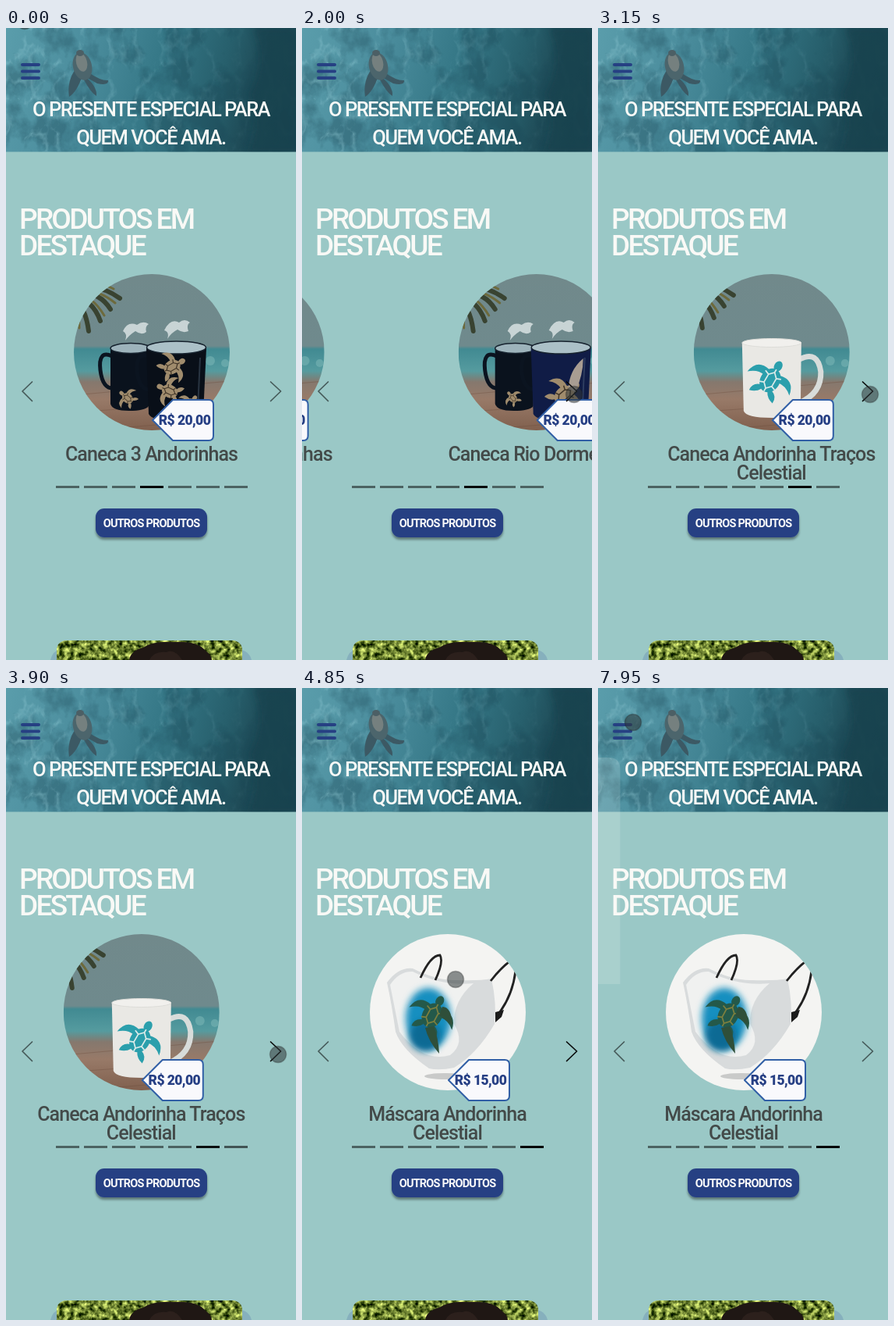
An HTML page that plays this animation: 372x809 px, repeating every 8 s.

```html
<!DOCTYPE html>
<html lang="pt-BR">
<head>
<meta charset="utf-8">
<title>Produtos em destaque</title>
<style>
  html, body { margin: 0; height: 100%; overflow: hidden; background: #9ac8c6; }
  svg { display: block; width: 100vw; height: 100vh; }
  text { font-family: Roboto, Inter, sans-serif; font-weight: 500; }
  .middle { text-anchor: middle; }
  .hero { font-size: 25.5px; letter-spacing: -1.5px; fill: #f9f9f6; }
  .title { font-size: 37px; letter-spacing: -2.7px; fill: #f9f9f6; }
  .name { font-size: 25px; letter-spacing: -.9px; fill: #434a49; }
  .price { font-size: 17.5px; font-weight: 800; letter-spacing: -.6px; fill: #263f84; }
  .button { font-size: 14.5px; font-weight: 700; letter-spacing: -.8px; fill: #fafafa; }
  .link { font-size: 18px; font-weight: 700; fill: #263f84; }
</style>
</head>
<body>
<svg viewBox="0 0 372 809" preserveAspectRatio="none">
  <defs>
    <linearGradient id="water" x2="1" y2=".12">
      <stop offset="0" stop-color="#5a9dab"/>
      <stop offset=".3" stop-color="#4b8d9d"/>
      <stop offset=".55" stop-color="#367887"/>
      <stop offset=".78" stop-color="#275f6c"/>
      <stop offset=".9" stop-color="#1f4c58"/>
      <stop offset="1" stop-color="#1c4854"/>
    </linearGradient>
    <linearGradient id="beach" x2="0" y2="1">
      <stop offset="0" stop-color="#71898b"/>
      <stop offset=".46" stop-color="#6f8a8d"/>
      <stop offset=".48" stop-color="#418a92"/>
      <stop offset=".62" stop-color="#559b9f"/>
      <stop offset=".69" stop-color="#85786e"/>
      <stop offset=".8" stop-color="#987a68"/>
      <stop offset="1" stop-color="#80604e"/>
    </linearGradient>
    <filter id="soft" x="-30%" y="-30%" width="160%" height="160%"><feGaussianBlur stdDeviation="4"/></filter>
    <filter id="shadow" x="-10%" y="-10%" width="120%" height="150%">
      <feDropShadow dx="0" dy="3" stdDeviation="1.6" flood-opacity=".4"/>
    </filter>
    <filter id="ripples" x="0" y="0" width="100%" height="100%" color-interpolation-filters="sRGB">
      <feTurbulence type="turbulence" baseFrequency=".03 .022" numOctaves="4" seed="4"/>
      <feColorMatrix values="0 0 0 0 .6  0 0 0 0 .82  0 0 0 0 .86  -4 0 0 0 .95"/>
    </filter>
    <filter id="depths" x="0" y="0" width="100%" height="100%" color-interpolation-filters="sRGB">
      <feTurbulence type="fractalNoise" baseFrequency=".025 .02" numOctaves="5" seed="9"/>
      <feColorMatrix values="0 0 0 0 .1  0 0 0 0 .27  0 0 0 0 .33  5 0 0 0 -2.3"/>
    </filter>
    <filter id="grass" x="0" y="0" width="100%" height="100%" color-interpolation-filters="sRGB">
      <feTurbulence type="fractalNoise" baseFrequency=".16" numOctaves="3" seed="2"/>
      <feColorMatrix values="1.6 0 0 0 -.36  1.6 0 0 0 -.28  1 0 0 0 -.3  0 0 0 0 1"/>
    </filter>
    <linearGradient id="fade"><stop offset="0" stop-color="#fff"/><stop offset=".85" stop-color="#111"/></linearGradient>
    <mask id="leftLight"><rect width="372" height="158" fill="url(#fade)"/></mask>
    <clipPath id="heroBox"><rect width="372" height="158.500"/></clipPath>
    <clipPath id="disc"><circle cx="187" cy="415" r="100"/></clipPath>
    <clipPath id="card"><rect x="65" y="784" width="238" height="60" rx="12"/></clipPath>

    <g id="turtle">
      <ellipse rx="11" ry="14"/>
      <ellipse cy="-18" rx="4.5" ry="6"/>
      <path d="M-7-10Q-24-14-27 4Q-18-4-9-2ZM7-10Q24-14 27 4Q18-4 9-2ZM-7 9Q-16 12-15 21Q-7 19-4 13ZM7 9Q16 12 15 21Q7 19 4 13Z"/>
    </g>
    <path id="scutes" d="M0-10L5-5V5L0 10L-5 5V-5ZM5-5L10-7M5 5L10 7M-5-5L-10-7M-5 5L-10 7M0-10V-14M0 10V14" fill="none"/>
    <g id="palm" fill="none" stroke-linecap="round">
      <path d="M84 340Q112 322 146 346M84 340Q118 334 134 360M84 345Q110 345 121 375M84 345Q102 355 106 388M84 335Q112 314 130 325" stroke="#394331" stroke-width="6"/>
      <path d="M84 350Q94 360 94 384M84 338Q112 330 140 352M84 342Q108 338 126 368M84 332Q108 318 138 334" stroke="#6d6a3c" stroke-width="3"/>
    </g>
    <g id="scene">
      <rect x="87" y="315" width="200" height="200" fill="url(#beach)"/>
      <circle cx="262" cy="426" r="6" fill="#79b5b4" opacity=".6"/>
      <circle cx="281" cy="429" r="5" fill="#79b5b4" opacity=".6"/>
      <path d="M87 470L287 452M87 492L287 478M110 515L287 500" stroke="#6b4a3a" opacity=".35"/>
    </g>
    <g id="steam" fill="#dfe7e8" opacity=".8">
      <path d="M150 388Q156 375 168 380Q176 374 183 379Q178 382 180 389Q174 394 166 388Q158 393 153 400Q156 391 150 388Z"/>
      <path d="M203 387Q211 371 222 377Q229 371 236 377Q231 380 234 388Q227 391 220 386Q212 390 207 398Q210 389 203 387Z"/>
    </g>
    <g id="mugs">
      <path d="M136 420Q118 412 121 438Q124 463 139 461" fill="none" stroke="#0b1420" stroke-width="5"/>
      <path d="M134 410V481Q136 490 158 490Q178 490 183 484V410Z" fill="#0a121d"/>
      <ellipse cx="160" cy="410" rx="26" ry="6.5" fill="#9db3bb" stroke="#16222e" stroke-width="1.500"/>
      <path d="M184 420Q166 414 168 440Q171 464 186 463" fill="none" stroke="#0b1420" stroke-width="5"/>
      <path d="M180 410L183 494Q187 503 219 503Q250 503 253 494L257 410Z"/>
      <ellipse cx="218.500" cy="409" rx="38" ry="8" fill="#abc0c7" stroke="#16222e" stroke-width="1.500"/>
      <path d="M249 422L246 488" stroke="#667b90" stroke-width="2" opacity=".35"/>
    </g>
    <path id="tag" d="M188 502L214 476H260Q266 476 266 482V522Q266 528 260 528H214Z" fill="#f9f9fc" stroke="#315fa6" stroke-width="2" stroke-linejoin="round"/>
  </defs>

  <rect width="372" height="809" fill="#9ac8c6"/>

  <g clip-path="url(#heroBox)">
    <rect width="372" height="159" fill="url(#water)"/>
    <rect width="372" height="159" filter="url(#depths)" opacity=".35"/>
    <g mask="url(#leftLight)"><rect width="372" height="159" filter="url(#ripples)" opacity=".5"/></g>
    <path d="M315 0Q338 40 312 85Q328 120 310 159H372V0Z" fill="#173f4b" opacity=".55" filter="url(#soft)"/>
  </g>
  <g fill="#3c5964">
    <path d="M89 53Q78 68 81 88Q91 82 98 61ZM106 57Q122 68 131 67Q132 74 117 71L101 62ZM101 62Q117 74 116 87Q108 82 100 66Z"/>
    <ellipse cx="98" cy="49" rx="12" ry="18" transform="rotate(-14 98 49)" fill="#4c656c"/>
    <ellipse cx="97" cy="44" rx="7" ry="12" transform="rotate(-14 97 44)" fill="#75807f"/>
    <ellipse cx="95" cy="32" rx="5" ry="4" fill="#4c5f65"/>
  </g>
  <text class="hero middle" x="186" y="113">O PRESENTE ESPECIAL PARA</text>
  <text class="hero middle" x="186" y="149">QUEM VOCÊ AMA.</text>

  <text class="title" x="17" y="257">PRODUTOS EM</text>
  <text class="title" x="17" y="291">DESTAQUE</text>

  <g id="slides"></g>
  <g id="dots"></g>
  <g fill="none" stroke="#000" stroke-width="1.700" stroke-linecap="round" stroke-linejoin="round">
    <path d="M33.500 453L21 465L33.500 477.500" opacity=".55"/>
    <path id="next" d="M339.500 453L352.500 465L339.500 477.500"/>
  </g>

  <rect x="115" y="615" width="143" height="37" rx="11" fill="#264083" filter="url(#shadow)"/>
  <text class="button middle" x="186.500" y="639">OUTROS PRODUTOS</text>

  <path d="M57 809Q60 797 70 795H298Q312 797 315 809Z" fill="#86b0bd"/>
  <g clip-path="url(#card)">
    <rect x="65" y="784" width="238" height="30" filter="url(#grass)"/>
    <path d="M158 809Q160 797 176 793Q190 784 215 786Q245 784 256 797Q264 803 264 809Z" fill="#1f1714"/>
    <path d="M184 809Q190 797 206 799Q216 794 226 809Z" fill="#2c201c"/>
  </g>

  <g id="panel">
    <path d="M0 89H19L29 79L39 89H172Q187 89 187 104V379H0Z" fill="#f7f5f2"/>
    <text class="link middle" x="93" y="135">Loja</text>
    <text class="link middle" x="93" y="195">Projetos</text>
    <text class="link middle" x="93" y="255">História</text>
    <rect x="33" y="299" width="120" height="37" rx="11" fill="#264083" filter="url(#shadow)"/>
    <text class="button middle" x="93" y="323">CONTATO</text>
  </g>

  <g stroke="#264083" stroke-width="4" stroke-linecap="round">
    <path id="barTop" d="M-10.500 0H10.500"/>
    <path id="barMiddle" d="M-10.500 0H10.500"/>
    <path id="barBottom" d="M-10.500 0H10.500"/>
  </g>
  <circle id="pointer" r="10.500" fill="#303638" fill-opacity=".55" stroke="#222" stroke-opacity=".3" stroke-width="1.500"/>
</svg>

<script>
const LOOP = 8000, STEP = 50, WIDTH = 372;
const SLIDE_STARTS = [1630, 2680, 3820];
const MENU_OPEN = 5870, MENU_CLOSE = 7675;
const byId = id => document.getElementById(id);
const clamp = v => Math.max(0, Math.min(1, v));

function bezier(x1, y1, x2, y2) {
  const at = (a, b, s) => 3 * a * s * (1 - s) ** 2 + 3 * b * s * s * (1 - s) + s ** 3;
  return x => {
    let low = 0, high = 1;
    for (let i = 0; i < 24; i++) {
      const mid = (low + high) / 2;
      if (at(x1, x2, mid) < x) low = mid; else high = mid;
    }
    return x <= 0 ? 0 : x >= 1 ? 1 : at(y1, y2, low);
  };
}
const ease = bezier(.25, .1, .25, 1);
const easeInOut = bezier(.42, 0, .58, 1);

const turtle = (x, y, turn, scale, fill, lines) =>
  `<g transform="translate(${x} ${y}) rotate(${turn}) scale(${scale})">
    <use href="#turtle" fill="${fill}"/><use href="#scutes" stroke="${lines}" stroke-width="1.5"/></g>`;
const tanTurtle = (x, y, turn, scale) => turtle(x, y, turn, scale, '#a08c6d', '#3f3427');

const beachMugs = (body, decor) => `<use href="#scene"/><use href="#palm"/>
  <use href="#mugs" fill="${body}"/><use href="#steam"/>${decor}`;

const whiteMug = `<use href="#scene"/><use href="#palm" transform="translate(-8 -4)"/>
  <path d="M223 424Q246 412 250 440Q251 468 222 480" fill="none" stroke="#d8dcda" stroke-width="7"/>
  <path d="M149 403L151 490Q154 499 187 499Q221 499 224 490L225 403Z" fill="#e9e8e4"/>
  <ellipse cx="187" cy="403" rx="38" ry="5.5" fill="#f1f0ed" stroke="#dcdcd8" stroke-width="1"/>
  ${turtle(185, 451, 30, 1.15, '#2b9fac', '#dcebe9')}`;

const mask = `<rect x="87" y="315" width="200" height="200" fill="#f4f4f2"/>
  <ellipse cx="184" cy="497" rx="27" ry="4" fill="#c9cac9"/>
  <path d="M109 377Q124 357 142 359Q174 375 198 374Q228 375 243 372Q250 404 247 430Q225 468 195 486Q176 490 163 487Q128 463 120 440Q115 404 109 377Z" fill="#d8dbdc"/>
  <path d="M113 380Q125 362 142 363Q180 382 220 378Q194 400 195 430Q210 455 190 470Q155 480 125 440Z" fill="#f0f1f0"/>
  <path d="M152 371Q165 342 177 342Q182 350 171 374M242 375Q256 357 268 349M274 362Q270 394 252 417" fill="none" stroke="#222" stroke-width="2.800"/>
  <path d="M248 415L259 412L256 421L248 428Z" fill="#1b1b1b"/>
  <ellipse cx="162" cy="423" rx="29" ry="39" fill="#158fc0" filter="url(#soft)"/>
  <ellipse cx="158" cy="445" rx="20" ry="20" fill="#0c6b94" filter="url(#soft)"/>
  ${turtle(167, 419, 28, 1.15, '#24594a', '#7d7f3e')}
  <path d="M180 408Q192 408 193 432Q183 424 176 419ZM158 435Q162 452 176 468Q175 448 169 433Z" fill="#2f4f3a"/>`;

const products = [
  [beachMugs('#090f18', tanTurtle(156, 474, -50, .55) + tanTurtle(213, 434, 60, .8) +
    tanTurtle(210, 465, -65, .75) + tanTurtle(235, 482, 40, .6)),
    'R$ 20,00', 'Caneca 3 Andorinhas'],
  [beachMugs('#101c46', tanTurtle(157, 474, -40, .45) + tanTurtle(223, 470, 50, 1) +
    '<path d="M237 466Q247 444 247 423Q229 438 228 462Z" fill="#a89d92"/>'),
    'R$ 20,00', 'Caneca Rio Dormente'],
  [whiteMug, 'R$ 20,00', 'Caneca Andorinha Traços', 'Celestial'],
  [mask, 'R$ 15,00', 'Máscara Andorinha', 'Celestial']
];

byId('slides').innerHTML = products.map(([picture, price, ...lines]) => `<g>
  <g clip-path="url(#disc)">${picture}</g><use href="#tag"/>
  <text class="price middle" x="229" y="508">${price}</text>
  ${lines.map((line, i) => `<text class="name middle" x="186.5" y="${554 + i * 24}">${line}</text>`).join('')}
</g>`).join('');
byId('dots').innerHTML = Array.from({ length: 7 }, (_, i) =>
  `<rect x="${64 + i * 36}" y="586" width="30" height="3"/>`).join('');
const slides = [...byId('slides').children], dots = [...byId('dots').children];

// time, x, y
const pointerPath = [
  [100, 24, -9], [250, 15, 70], [450, 120, 240], [700, 320, 440], [850, 356, 470],
  [1050, 356, 470], [1250, 349, 469], [4450, 349, 469], [4700, 267, 431], [4800, 267, 431],
  [4850, 197, 373], [5000, 110, 215], [5150, 45, 80], [5300, 11, 20], [5450, 26, 65],
  [5550, 26, 65], [5700, 31, 55], [7750, 31, 55], [7950, 45, 44]
];
function pointerAt(t) {
  const i = pointerPath.findIndex(p => p[0] > t);
  if (i < 0) return pointerPath.at(-1).slice(1);
  if (i === 0) return pointerPath[0].slice(1);
  const [t0, x0, y0] = pointerPath[i - 1], [t1, x1, y1] = pointerPath[i];
  const k = (t - t0) / (t1 - t0);
  return [x0 + (x1 - x0) * k, y0 + (y1 - y0) * k];
}

const move = (id, x, y, turn = 0) =>
  byId(id).setAttribute('transform', `translate(${x} ${y}) rotate(${turn})`);

function draw(t) {
  const elapsed = SLIDE_STARTS.map(start => t - start < 70 ? 0 : clamp((t - start) / 600));
  const position = elapsed.reduce((sum, x) => sum + easeInOut(x), 0);
  slides.forEach((slide, i) => {
    slide.setAttribute('transform', `translate(${(i - position) * WIDTH})`);
    slide.style.display = Math.abs(i - position) < 1 ? '' : 'none';
  });
  const shown = [1, ...elapsed.map(ease), 0];
  dots.forEach((dot, i) => {
    const weight = i < 3 ? 0 : shown[i - 3] - shown[i - 2];
    dot.setAttribute('opacity', .5 + .5 * (weight || 0));
  });

  const hover = clamp((t - 750) / 150) - clamp((t - MENU_OPEN) / 150);
  byId('next').setAttribute('opacity', .55 + .4 * hover);

  const open = ease(clamp((t - MENU_OPEN) / 500)) - ease(clamp((t - MENU_CLOSE) / 500));
  move('panel', (open - 1) * 187, 0);
  byId('panel').setAttribute('opacity', open);

  const cross = ease(clamp((t - MENU_OPEN) / 250)) - ease(clamp((t - MENU_CLOSE) / 250));
  const x = 31.5 - 1.5 * cross, gap = 8.5 * (1 - cross);
  move('barTop', x, 55.5 - gap, 45 * cross);
  move('barMiddle', x, 55.5);
  byId('barMiddle').setAttribute('opacity', 1 - cross);
  move('barBottom', x, 55.5 + gap, -45 * cross);

  move('pointer', ...pointerAt(t));
}

function frame(now) {
  draw(Math.floor(now % LOOP / STEP) * STEP);
  requestAnimationFrame(frame);
}
draw(0);
requestAnimationFrame(frame);
</script>
</body>
</html>
```
